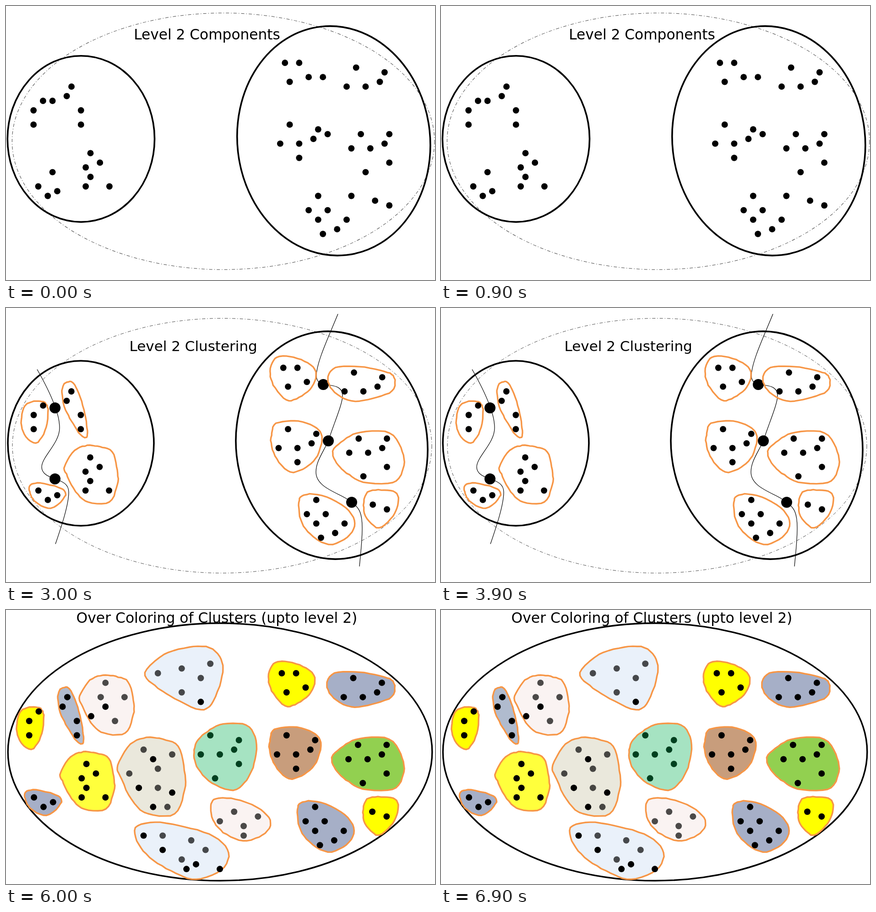
An HTML page that plays this animation: 937 px wide and 598 px high, repeating every 7.5 s.

```html
<!DOCTYPE html>
<html lang="en">
<head>
<meta charset="utf-8">
<title>Cluster coloring</title>
<style>
  html, body { margin: 0; width: 100%; height: 100%; overflow: hidden; background: #fff; }
  svg { display: block; width: 100%; height: 100%; }
  text { font-family: "DejaVu Sans", sans-serif; }
</style>
</head>
<body>
<svg id="stage" viewBox="0 0 937 598"></svg>
<script>
const SCENE_MS = 1500;
const TITLE_SIZE = 31;
const ORANGE = '#f79646', STEEL = '#a6afc7', YELLOW = '#ffff00';
const PINK = '#faf3f2', ICE = '#eaf1fa';

// Title with its position, then the scale and shift of the drawing
const scenes = [
  { title: 'Level 2 Components', x: 279.2, y: 73, scale: 1.0072, dx: -0.8, dy: -7.4 },
  { title: 'Level 2 Decomposition', x: 235.5, y: 101, scale: 1.002, dx: -0.1, dy: 2.5 },
  { title: 'Level 2 Clustering', x: 269.5, y: 94, scale: 1, dx: 0, dy: 0 },
  { title: 'Level 2 –Cluster Coloring', x: 188.5, y: 107.5, scale: 1.0092, dx: -0.1, dy: 4.2 },
  { title: 'Over Coloring of Clusters (upto level 2)', x: 153.6, y: 28, scale: 1.0118, dx: -10.5, dy: 6 }
];

// Outlines are a few key points; dots are cells (column,row) of one regular grid
const block = '178,300 205,303 232,314 243,354 243,385 226,424 180,424 152,401 132,362 128,345 150,311';

const clusters = [
  { fill: YELLOW, outline: '66,203 85,207 92,226 85,268 65,295 40,276 33,245 42,213', dots: '2,8 0,10 0,13' },
  { fill: '#b0bbce', outline: '128,165 142,161 153,173 168,213 176,255 177,280 166,280 147,253 130,222 122,185', dots: '8,5 7,7 10,10 10,13' },
  { fill: '#ffff3c', outline: block, dots: '12,19 14,21 11,22 12,24 11,26 16,26' },
  { fill: STEEL, outline: '53,387 75,382 123,395 128,413 98,437 65,424 53,405', dots: '1,26 5,27 3,28' },
  { fill: YELLOW, outline: '588,110 612,105 652,116 677,140 668,172 640,195 612,201 584,168 577,138', dots: '53,0 56,0 54,4 58,3' },
  { fill: STEEL, outline: '720,130 772,128 826,138 848,152 843,181 800,198 755,203 718,184 703,155', dots: '68,1 74,2 73,4 66,5 70,5' },
  { fill: '#c89d7c', outline: '590,252 630,246 672,258 690,280 680,322 655,348 621,358 592,330 579,295 582,268', dots: '54,13 60,14 59,16 52,17 56,17 56,20' },
  { fill: '#92d050', outline: '714,312 738,288 775,271 838,273 866,314 868,350 845,381 780,380 744,360 722,338', dots: '69,15 75,15 67,18 71,18 74,17 75,21 70,23' },
  { fill: STEEL, outline: '640,425 650,408 690,409 742,436 762,470 745,501 705,516 665,494 644,462', dots: '60,28 58,31 62,31 60,33 66,33 64,35 61,36' },
  { fill: YELLOW, outline: '790,402 820,397 850,402 857,425 845,454 815,480 788,460 781,430', dots: '72,29 75,30' }
];

const outerClusters = [
  { fill: PINK, outline: block, box: [161, 142, 117, 127], dots: '16,7 13,9', faded: '16,2 15,5 20,5 18,10' },
  { fill: '#eae8dc', outline: block, box: [244, 278, 146, 167], dots: '26,18 23,24 30,25 26,28', faded: '24,16 30,17 27,20 21,21 27,24 29,28' },
  { fill: ICE, outline: '304,137 325,165 368,193 425,218 453,198 472,145 470,108 444,82 400,81 345,97', dots: '36,6', faded: '27,0 32,-1 38,-2 36,1 32,4' },
  { fill: '#a6e3c2', outline: '411,317 416,288 440,265 475,249 525,251 546,285 542,335 525,372 497,393 450,378 420,347', green: '38,13 44,14 43,16 36,17 40,17 44,19 39,22' },
  { fill: PINK, outline: clusters[8].outline, box: [448, 412, 130, 92], faded: '43,29 48,30 40,31 45,32 45,34' },
  { fill: ICE, outline: '283,475 325,463 390,473 455,495 486,530 470,568 415,588 370,574 322,546 290,512', dots: '24,34 28,37 35,40 33,41 40,41', faded: '28,34 34,35 37,37 32,39' }
];

const mergedDots = '4,8 4,23 61,3 62,15 67,28';
const separators = '107,218 107,373 693,167 704,290 755,424';
const cuts = [
  'M68,134 C80,155 97,188 106,212 C113,232 117,245 117,262 C117,295 78,325 78,347 C78,362 93,368 107,373 C125,379 137,385 137,402 C137,430 120,480 108,515',
  'M725,13 C706,60 678,118 678,148 C678,158 684,164 692,167 C720,169 735,172 735,192 C735,210 715,255 704,290 C692,316 677,335 677,358 C677,395 735,405 755,424 C772,436 778,448 778,480 C778,510 774,540 772,564'
];

const stage = document.getElementById('stage');
const parts = [];

function add(parent, tag, attrs = {}, shownIn) {
  const el = document.createElementNS('http://www.w3.org/2000/svg', tag);
  for (const key in attrs) el.setAttribute(key, attrs[key]);
  parent.appendChild(el);
  if (shownIn) parts.push({ el, shownIn });
  return el;
}

const parse = list => list.split(' ').map(pair => pair.split(',').map(Number));

function fitTo(points, box) {
  if (!box) return points;
  return points.map(p => p.map((v, k) => {
    const values = points.map(q => q[k]);
    const low = Math.min(...values), high = Math.max(...values);
    return box[k] + (v - low) / (high - low) * box[k + 2];
  }));
}

function seededRandom(seed) {
  return () => (seed = (seed * 16807) % 2147483647) / 2147483647;
}

// Closed Catmull-Rom curve with a slight hand-drawn wobble
function handDrawn(points, seed) {
  const random = seededRandom(seed), n = points.length, steps = 5;
  const path = [];
  for (let i = 0; i < n; i++) {
    const [a, b, c, d] = [-1, 0, 1, 2].map(k => points[(i + k + n) % n]);
    for (let s = 0; s < steps; s++) {
      const t = s / steps;
      path.push(b.map((v, k) => {
        const smooth = v + t / 2 * (c[k] - a[k]
          + t * (2 * a[k] - 5 * v + 4 * c[k] - d[k] + t * (3 * (v - c[k]) + d[k] - a[k])));
        return (smooth + (random() - 0.5) * 1.4).toFixed(1);
      }));
    }
  }
  return path.join(' ');
}

function addOutlines(parent, list, filled) {
  const group = add(parent, 'g', { stroke: ORANGE, 'stroke-width': 3.4, 'stroke-linejoin': 'round' });
  list.forEach(({ fill, outline, box }, i) => add(group, 'polygon', {
    points: handDrawn(fitTo(parse(outline), box), 1009 * (i + 1)),
    fill: filled ? fill : 'none'
  }));
}

function addDots(parent, list = '', attrs, shownIn) {
  if (!list) return;
  const group = add(parent, 'g', attrs, shownIn);
  for (const [col, row] of parse(list)) {
    add(group, 'circle', { cx: 60.5 + 10.287 * col, cy: 130.5 + 10.3 * row, r: 6.9 });
  }
}

const finale = add(stage, 'g', {}, [4]);
add(finale, 'ellipse', { cx: 467.5, cy: 309.8, rx: 463.3, ry: 281, fill: 'none', stroke: '#000', 'stroke-width': 3.4 });
addOutlines(finale, outerClusters, true);

const drawing = add(stage, 'g');
add(drawing, 'ellipse', {
  cx: 472, cy: 300.5, rx: 458, ry: 278, fill: 'none', stroke: '#444',
  'stroke-width': 1, 'stroke-dasharray': '7 4 1.5 4'
}, [0, 1, 2]);

const rings = add(drawing, 'g', { fill: 'none', stroke: '#000', 'stroke-width': 3.6 }, [0, 1, 2, 3]);
add(rings, 'ellipse', { cx: 163.5, cy: 295.3, rx: 159.5, ry: 180 });
add(rings, 'ellipse', { cx: 711.5, cy: 299.5, rx: 209, ry: 249, transform: 'rotate(-6.3 711.5 299.5)' });

addOutlines(add(drawing, 'g', {}, [3, 4]), clusters, true);

const cutting = add(drawing, 'g', {}, [1, 2, 3]);
for (const d of cuts) add(cutting, 'path', { d, fill: 'none', stroke: '#000', 'stroke-width': 1.2 });
for (const [cx, cy] of parse(separators)) add(cutting, 'circle', { cx, cy, r: 12 });

addOutlines(add(drawing, 'g', {}, [2]), clusters, false);

for (const { dots } of clusters) addDots(drawing, dots);
addDots(drawing, mergedDots, {}, [0]);
for (const { dots, faded, green } of outerClusters) {
  addDots(drawing, dots, {}, [4]);
  addDots(drawing, faded, { 'fill-opacity': 0.7 }, [4]);
  addDots(drawing, green, { fill: '#00401f' }, [4]);
}

const title = add(stage, 'text');
let current = -1;

function render(time) {
  const index = Math.floor(time / SCENE_MS) % scenes.length;
  if (index === current) return;
  current = index;
  const { title: label, x, y, scale, dx, dy } = scenes[index];
  drawing.setAttribute('transform', `translate(${dx} ${dy}) scale(${scale})`);
  for (const { el, shownIn } of parts) el.style.display = shownIn.includes(index) ? '' : 'none';
  title.textContent = label;
  title.setAttribute('x', x);
  title.setAttribute('y', y);
  title.setAttribute('font-size', TITLE_SIZE * scale);
}

const start = performance.now();
function tick() {
  render(performance.now() - start);
  requestAnimationFrame(tick);
}
tick();
</script>
</body>
</html>
```
